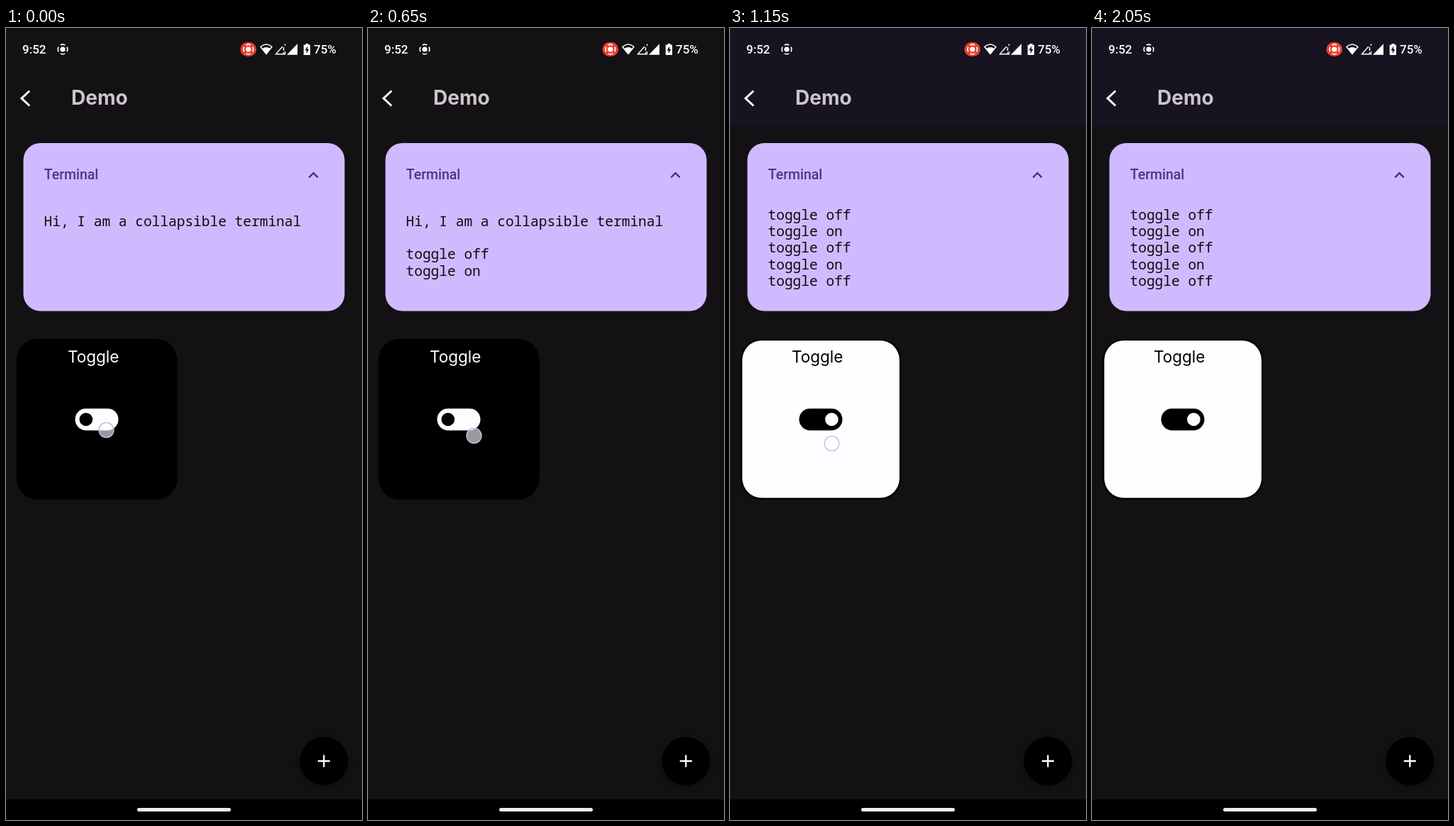
An HTML page that plays this animation: 502x1115 px, repeating every 2.35 s.

```html
<!DOCTYPE html>
<html lang="en">
<head>
<meta charset="utf-8">
<title>Toggle demo</title>
<style>
  html, body { margin: 0; width: 100%; height: 100%; overflow: hidden; background: #141115; }
  svg { display: block; width: 100%; height: 100%; }
  .status { font: 500 17px Roboto, sans-serif; fill: #fff; }
  .heading { font: 700 28px Inter, sans-serif; fill: #cbc5cc; }
  .label { font: 500 19.5px Roboto, sans-serif; fill: #4f3487; }
  .tile { font: 400 22.5px Inter, sans-serif; }
  .log { font: 400 19.5px "Noto Sans Mono", monospace; fill: #0c0a10; white-space: pre; }
  .line { fill: none; stroke: #fff; }
</style>
</head>
<body>
<svg viewBox="0 0 502 1115">
  <defs>
    <clipPath id="logArea"><rect x="40" y="252" width="420" height="130"/></clipPath>
    <filter id="shadow" x="-30%" y="-30%" width="160%" height="160%"><feGaussianBlur stdDeviation="4"/></filter>
    <g id="record">
      <circle r="3.6" fill="#fff"/>
      <circle class="line" r="6.8" stroke-width="1.6" pathLength="80" stroke-dasharray="13 7" stroke-dashoffset="-3.5" transform="rotate(-45)"/>
    </g>
  </defs>

  <rect width="502" height="1115" fill="#141115"/>
  <rect id="header" width="502" height="138" fill="#171320"/>

  <!-- Status bar -->
  <text class="status" x="23" y="36">9:52</text>
  <use href="#record" x="80" y="30"/>
  <rect x="330.5" y="20" width="22.5" height="20" rx="10" fill="#ea4032"/>
  <use href="#record" x="341.8" y="30"/>
  <path class="line" d="M359 26.5Q367 19.5 375 26.5L367 36.5Z" stroke-width="1.6" stroke-linejoin="round"/>
  <path d="M361.5 29Q367 25 372.5 29L367 36.5Z" fill="#fff"/>
  <path class="line" d="M390 26L380.5 36.8H393.5V33M393.5 22.5V25" stroke-width="1.4"/>
  <path class="line" d="M391.5 27V32M391.5 34V36" stroke-width="1.5"/>
  <path d="M396 37.8L411 22.3V37.8Z" fill="#fff"/>
  <path d="M422.5 22H426.5V23.7H429V38H419.7V23.7H422.5Z" fill="#fff"/>
  <path d="M425.2 25.5L421.5 31.6H423.8V36L427.3 29.9H425.2Z" fill="#141115"/>
  <text class="status" x="434" y="36">75%</text>

  <!-- App bar -->
  <path class="line" d="M33.2 88.5L22 99L33.2 109.5" stroke-width="3"/>
  <text class="heading" x="92" y="108">Demo</text>

  <!-- Terminal -->
  <rect x="24.5" y="162" width="453" height="236.5" rx="24" fill="#d0baff"/>
  <text class="label" x="53.7" y="213">Terminal</text>
  <path d="M427.3 210.3L433.5 204.2L439.7 210.3" fill="none" stroke="#4a3180" stroke-width="2.4"/>
  <g clip-path="url(#logArea)"><g id="log" class="log"></g></g>

  <!-- Toggle tile -->
  <rect x="14.8" y="437.5" width="226.7" height="226.5" rx="30"/>
  <rect id="face" x="17.3" y="440" width="221.7" height="221.5" rx="27.5"/>
  <text id="caption" class="tile" x="87" y="471">Toggle</text>
  <rect id="track" x="97.5" y="535.8" width="61" height="30.6" rx="15.3"/>
  <circle id="knob" cy="551" r="9.3"/>
  <g id="touches"></g>

  <!-- Add button and navigation bar -->
  <circle cx="448.3" cy="1035" r="34" opacity=".35" filter="url(#shadow)"/>
  <circle cx="448.3" cy="1032" r="34"/>
  <path class="line" d="M439.8 1032H456.8M448.3 1023.5V1040.5" stroke-width="2.3"/>
  <rect y="1086" width="502" height="29"/>
  <rect x="185" y="1098" width="132" height="5" rx="2.5" fill="#eee"/>
</svg>
<script>
const LOOP = 2350, STEP = 50, FADE = 200;
const LINE_HEIGHT = 23.25, FIRST_LINE = 278.8, LAST_VISIBLE = 363;
const WHITE = '#fffdff', BLACK = '#000';

// Each tap: finger down, finger up, switch flips, finger position
const taps = [
  { down: 0, up: 50, flip: 100, x: 141.5, y: 566 },
  { down: 300, up: 400, flip: 450, x: 141, y: 573 },
  { down: 600, up: 660, flip: 700, x: 149.5, y: 574 },
  { down: 850, up: 900, flip: 950, x: 148.5, y: 576 },
  { down: 1050, up: 1110, flip: 1150, x: 143.5, y: 585 },
  { down: 1400, up: 1475, flip: 1500, x: 143, y: 579 },
  { down: 1700, up: 1775, flip: 1800, x: 143, y: 580 }
];

const el = id => document.getElementById(id);
const clamp = v => Math.max(0, Math.min(1, v));

function append(parent, tag, attrs, text = '') {
  const node = document.createElementNS('http://www.w3.org/2000/svg', tag);
  for (const name in attrs) node.setAttribute(name, attrs[name]);
  node.textContent = text;
  return parent.appendChild(node);
}

const messages = ['Hi, I am a collapsible terminal', '',
  ...taps.map((_, i) => 'toggle ' + (i % 2 ? 'on' : 'off'))];
const lines = messages.map((text, i) =>
  append(el('log'), 'text', { x: 53.5, y: FIRST_LINE + i * LINE_HEIGHT }, text));
const touches = taps.map(({ x, y }) => append(el('touches'), 'circle', {
  cx: x, cy: y, r: 10.4, fill: '#fff', 'fill-opacity': .6,
  stroke: '#c3b9e8', 'stroke-width': 1.5
}));

function draw(t) {
  const flips = taps.filter(tap => t >= tap.flip).length;
  const on = flips % 2 === 0;
  const back = on ? BLACK : WHITE, front = on ? WHITE : BLACK;
  el('face').setAttribute('fill', back);
  el('knob').setAttribute('fill', back);
  el('track').setAttribute('fill', front);
  el('caption').setAttribute('fill', front);
  el('knob').setAttribute('cx', on ? 112.8 : 143.4);

  const lastLine = FIRST_LINE + (flips + 1) * LINE_HEIGHT;
  const scroll = Math.max(0, lastLine - LAST_VISIBLE);
  el('log').setAttribute('transform', `translate(0 ${-scroll})`);
  lines.forEach((line, i) => line.setAttribute('visibility', i < flips + 2 ? 'visible' : 'hidden'));

  // The app bar is tinted once the log has scrolled
  el('header').setAttribute('opacity', clamp((t - taps[2].flip) / 200));

  taps.forEach((tap, i) => {
    const opacity = t < tap.down ? 0 : clamp(1 - (t - tap.up) / FADE);
    touches[i].setAttribute('opacity', opacity);
  });
}

const start = performance.now();
function tick() {
  const t = (performance.now() - start) % LOOP;
  draw(Math.floor(t / STEP) * STEP);
  requestAnimationFrame(tick);
}
tick();
</script>
</body>
</html>
```
